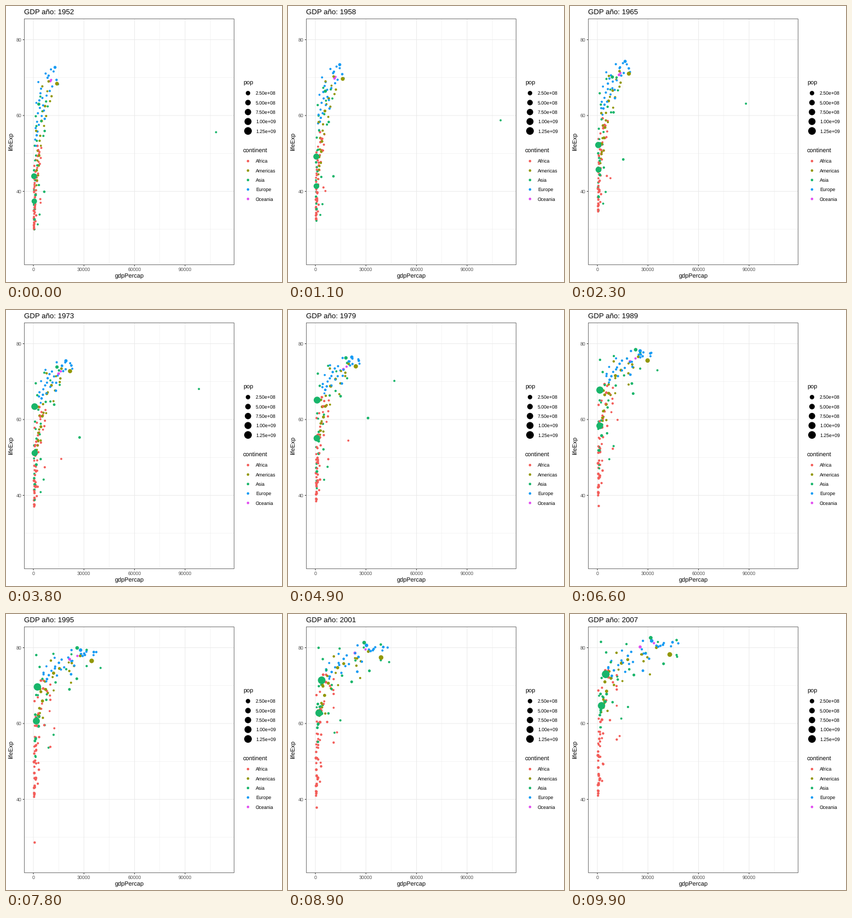
A matplotlib script that plays this animation: 504 by 504 pixels, repeating every 10 s.

```python
import numpy as np
import matplotlib.pyplot as plt
from matplotlib.animation import FuncAnimation

plt.rcParams.update({
    "font.family": ["Liberation Sans", "DejaVu Sans"],
    "text.hinting": "none",
    "path.snap": False,
})

SIZE, FRAMES = 504, 100
T = np.linspace(0, 1, FRAMES)
YEARS = 1952 + 55 * T
LEFT, TOP, RIGHT, BOTTOM = 33.5, 23.5, 416.5, 472.5
rng = np.random.default_rng(12)

COLORS = {
    "Africa": "#F35E5A",
    "Americas": "#929705",
    "Asia": "#18B56A",
    "Europe": "#169BF4",
    "Oceania": "#E14DF0",
}

# Per continent: count, bend of the spread, then the income range
# and the life range at the start, the middle and the end.
CLOUDS = {
    "Africa": (50, 1.2, [(300, 4700), (440, 8000), (380, 11500)],
               [(30, 52), (38.5, 66), (41, 74)]),
    "Americas": (24, 1, [(1400, 10800), (2200, 20000), (2300, 35000)],
                 [(39, 69), (55, 75), (63, 80.5)]),
    "Asia": (28, 1, [(340, 8500), (420, 19000), (950, 47000)],
             [(30, 65), (42, 75), (59, 82)]),
    "Europe": (30, .75, [(1100, 14700), (4200, 27500), (6500, 48000)],
               [(52, 72.7), (67, 76.5), (72, 81.8)]),
    "Oceania": (2, 1, [(10040, 10560), (16700, 18700), (25200, 34400)],
                [(69.1, 69.4), (73.3, 74), (80.2, 81.2)]),
}

# Paths that leave the crowd: population, then (year, income, life) keys
STANDOUTS = [
    ("Asia", 2.5, [(1952, 108382, 55.6), (1957, 113523, 58), (1967, 80895, 64.6),
                   (1972, 109348, 67.7), (1977, 59265, 69.3), (1982, 31354, 71.3),
                   (2007, 47307, 77.6)]),
    ("Asia", 28, [(1952, 6460, 39.9), (1967, 16900, 49.9), (1977, 34100, 58.7),
                  (1987, 21200, 66.3), (2007, 21655, 72.8)]),
    ("Africa", 1.4, [(1952, 4293, 37), (1967, 8358, 44.6), (1977, 21746, 52.8),
                     (1987, 11864, 60.2), (2007, 13206, 56.7)]),
    ("Africa", 9, [(1952, 493, 40), (1987, 848, 44), (1992, 737, 23.6), (2007, 863, 46.2)]),
    ("Asia", 127, [(1952, 3217, 63), (1967, 9848, 71.4), (1979, 18000, 76.2),
                   (2007, 31656, 82.6)]),
    ("Americas", 301, [(1952, 13990, 68.4), (1982, 25010, 74.6), (2007, 42952, 78.2)]),
    ("Asia", 1319, [(1952, 400, 44), (1957, 576, 50.5), (1962, 488, 44.5),
                    (1967, 613, 58.4), (1972, 677, 63.1), (1992, 1656, 68.7),
                    (2007, 4959, 73)]),
    ("Asia", 1110, [(1952, 547, 37.4), (1979, 835, 55), (2007, 2452, 64.7)]),
]


def bow(a, b, c):
    """Parabola through three values at the start, middle and end."""
    return a + (4 * b - 3 * a - c) * T + 2 * (a - 2 * b + c) * T ** 2


def spread(ranges, rank):
    """Follow one drifting rank inside a moving range."""
    low, high = (bow(*ends) for ends in zip(*ranges))
    return low + (high - low) * rank


def cloud(name, n, bend, incomes, lives):
    """Scattered ranks; richer places tend to live longer."""
    wealth = np.linspace(0, 1, n)
    health = np.empty(n)
    health[np.argsort(wealth + rng.normal(0, .28, n))] = wealth
    for u, v in zip(wealth ** bend, health ** bend):
        du, dv = rng.normal(0, .08, 2)
        pop = np.clip(rng.lognormal(2.1, 1.2), .3, 200)
        yield (name, pop,
               np.exp(spread(np.log(incomes), np.clip(u + du * T, 0, 1))),
               spread(lives, np.clip(v + dv * T, 0, 1)))


def standout(name, pop, keys):
    year, gdp, life = zip(*keys)
    return name, pop, np.interp(YEARS, year, gdp), np.interp(YEARS, year, life)


def px(gdp):
    return 50 + np.asarray(gdp) * 277 / 90000


def py(life):
    return 338.5 - (np.asarray(life) - 40) * 6.925


def diameter(pop):
    size = 1 + 5 * np.sqrt(np.asarray(pop) / 1319)
    return .75 * (2.845 * size + .945) + .7


crowd = [c for name, spec in CLOUDS.items() for c in cloud(name, *spec)]
rng.shuffle(crowd)
rows = crowd + [standout(*s) for s in STANDOUTS]
X = np.array([px(g) for _, _, g, _ in rows]).T
Y = np.array([py(e) for _, _, _, e in rows]).T
AREA = np.array([diameter(p * (.43 + .57 * T)) for _, p, _, _ in rows]).T ** 2

fig = plt.figure(figsize=(7, 7), dpi=72, facecolor="white")
ax = fig.add_axes([0, 0, 1, 1])
ax.set(xlim=(0, SIZE), ylim=(SIZE, 0))
ax.axis("off")


def line(xs, ys, width, color, z=1):
    ax.plot(xs, ys, lw=width, color=color, zorder=z,
            solid_capstyle="butt", solid_joinstyle="miter")


def label(x, y, s, size=8.8, color="black", **kw):
    return ax.text(x, y, s, fontsize=size, color=color, va="baseline", **kw)


def legend(y, head, names, sizes, colors):
    """Heading above a column of dots with labels."""
    label(432.8, y - 15.2, head, 11)
    ys = y + 17.28 * np.arange(len(names))
    ax.scatter([441.9] * len(names), ys, s=np.square(sizes), c=colors, lw=0)
    for yy, name in zip(ys, names):
        label(455.9, yy + 3.2, name)


# grid
for k in range(8):
    x = px(15000 * k)
    line([x, x], [TOP, BOTTOM], .53 if k % 2 else 1.07, "#EBEBEB")
for v in range(30, 90, 10):
    y = py(v)
    line([LEFT, RIGHT], [y, y], .53 if v % 20 else 1.07, "#EBEBEB")

# axes
for v in range(0, 90001, 30000):
    x = px(v)
    line([x, x], [BOTTOM, BOTTOM + 2.75], 1.07, "#333333")
    label(x, 484.3, str(v), color="#4D4D4D", ha="center")
for v in (40, 60, 80):
    y = py(v)
    line([LEFT - 2.75, LEFT], [y, y], 1.07, "#333333")
    label(28.2, y + 3.2, str(v), color="#4D4D4D", ha="right")
line([LEFT, RIGHT, RIGHT, LEFT, LEFT], [TOP, TOP, BOTTOM, BOTTOM, TOP], 1, "#6E6E6E", 5)
label(225, 497, "gdpPercap", 11, ha="center")
label(13, 247.7, "lifeExp", 11, ha="center", rotation=90, rotation_mode="anchor")
title = label(33.2, 15, "", 13.2)

# legends
pops = 250 * np.arange(1, 6)
legend(159.1, "pop", [f"{p * 1e6:.2e}" for p in pops], diameter(pops), ["black"] * 5)
legend(283.2, "continent", list(COLORS), [4.6] * 5, list(COLORS.values()))

dots = ax.scatter(X[0], Y[0], s=AREA[0], c=[COLORS[r[0]] for r in rows], lw=0, zorder=4)


def update(i):
    title.set_text(f"GDP año: {round(YEARS[i])}")
    dots.set_offsets(np.column_stack([X[i], Y[i]]))
    dots.set_sizes(AREA[i])
    return title, dots


anim = FuncAnimation(fig, update, frames=FRAMES, interval=100, repeat=True, repeat_delay=0)
plt.show()
```
